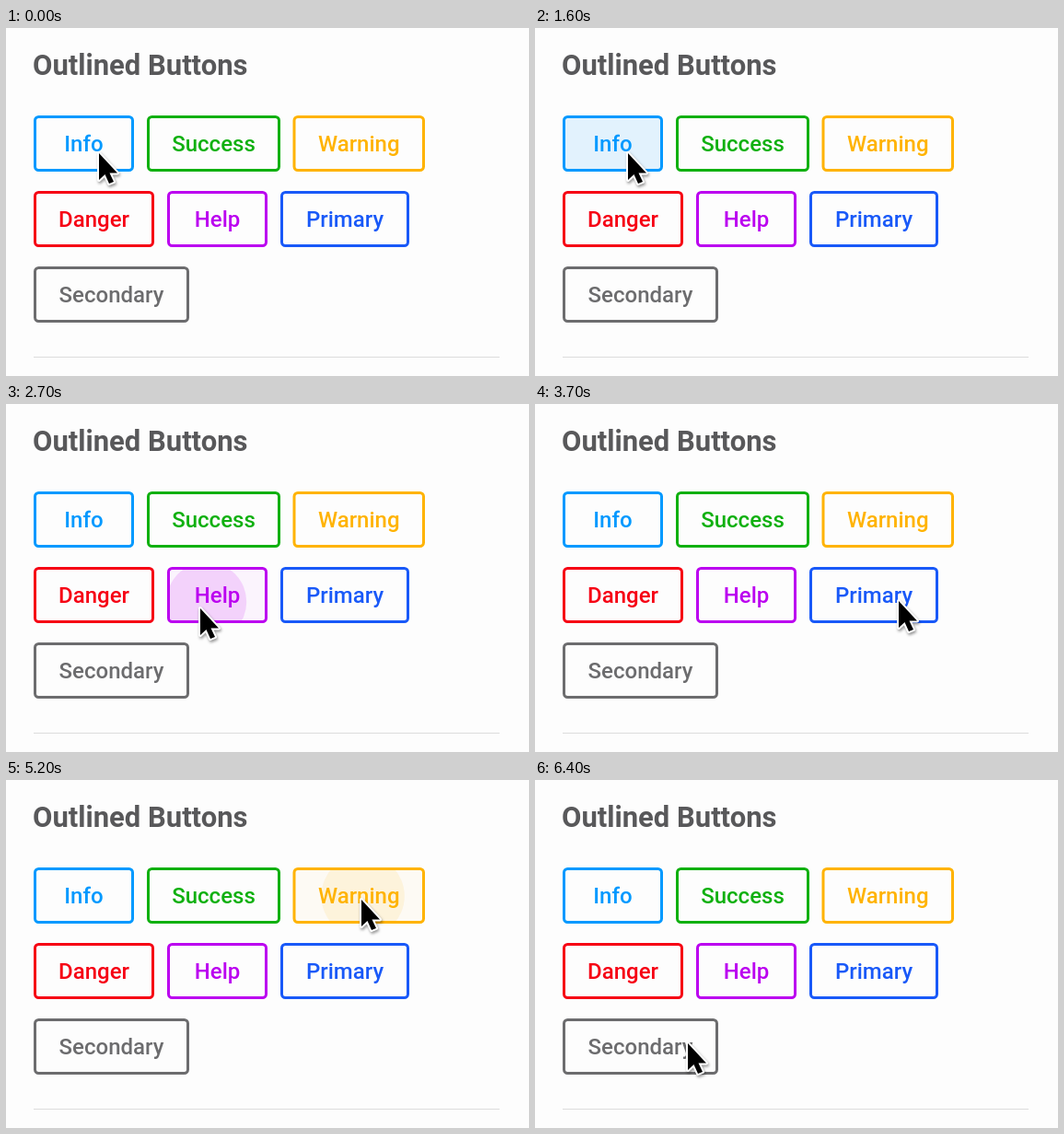
An HTML page for the animation above (6500 ms loop, 568 by 378 pixels).

```html
<!DOCTYPE html>
<html lang="en">
<head>
<meta charset="utf-8">
<title>Outlined Buttons</title>
<style>
  html, body { margin: 0; width: 100%; height: 100%; overflow: hidden; background: #fdfdfd; }
  svg { display: block; width: 568px; height: 378px; font-family: Roboto, sans-serif; }
  .label { font-size: 24px; font-weight: 500; text-anchor: middle; }
  .title { font-size: 31px; font-weight: 700; fill: #58585a; }
</style>
</head>
<body>
<svg id="stage" viewBox="0 0 568 378">
  <text class="title" x="29" y="51">Outlined Buttons</text>
  <g id="buttons"></g>
  <path d="M30 357.5H536" stroke="#dcdcdc"/>
  <g id="cursor">
    <path d="M0 0V29L6.5 23L11 33L16 31L11.5 21.5H20Z" stroke="#fff" stroke-width="4" stroke-linejoin="round"
      style="paint-order: stroke; filter: drop-shadow(1px 2px 1.5px #0006)"/>
  </g>
</svg>
<script>
const LOOP = 6500;
const HOVER = 0.035, FOCUS = 0.07, PRESS = 0.14;

// label, colour, left, top, width, hover start, press time
const BUTTONS = [
  ['Info', '#0099ff', 30, 95, 109, 1000, 1250],
  ['Success', '#10b010', 153, 95, 145],
  ['Warning', '#ffb300', 311.5, 95, 143.5, 5050, 5165],
  ['Danger', '#f60014', 30, 177, 131],
  ['Help', '#bb00f0', 175, 177, 109, 2480, 2640],
  ['Primary', '#1959f8', 298, 177, 140, 3720, 3950],
  ['Secondary', '#6c6c6e', 30, 259, 169]
];
const HEIGHT = 61;

// arrive, leave, x, y
const STOPS = [
  [0, 1950, 101, 136],
  [2500, 3080, 211, 222],
  [3650, 4450, 395, 214],
  [5050, 5650, 386, 130],
  [6300, LOOP, 166, 286]
];

const clamp = v => Math.max(0, Math.min(1, v));
const ramp = (t, from, to) => clamp((t - from) / (to - from));
const mix = (a, b, k) => a + (b - a) * k;
const easeMove = k => k * k * (3 - 2 * k);

// cubic-bezier(.4, 0, .2, 1)
function easeRipple(x) {
  let lo = 0, hi = 1, s = x;
  for (let i = 0; i < 20; i++) {
    s = (lo + hi) / 2;
    const bx = 1.2 * s * (1 - s) ** 2 + 0.6 * s * s * (1 - s) + s ** 3;
    if (bx < x) lo = s; else hi = s;
  }
  return 3 * s * s * (1 - s) + s ** 3;
}

function add(parent, tag, attrs) {
  const node = document.createElementNS('http://www.w3.org/2000/svg', tag);
  for (const key in attrs) node.setAttribute(key, attrs[key]);
  return parent.appendChild(node);
}

function set(node, attrs) {
  for (const key in attrs) node.setAttribute(key, attrs[key]);
}

function cursorAt(t) {
  const next = STOPS.findIndex(([, leave]) => t < leave);
  const [arrive, , x, y] = STOPS[next];
  if (t >= arrive) return [x, y];
  const [, leave, px, py] = STOPS[next - 1];
  const k = easeMove(ramp(t, leave, arrive));
  return [mix(px, x, k), mix(py, y, k)];
}

const layer = document.getElementById('buttons');
const cursor = document.getElementById('cursor');

const active = BUTTONS.map(([text, color, x, y, w, hover, press], i) => {
  const box = { x, y, width: w, height: HEIGHT, rx: 5 };
  const cx = x + w / 2, cy = y + HEIGHT / 2;
  const g = add(layer, 'g', {});
  const clip = add(g, 'clipPath', { id: 'clip' + i });
  add(clip, 'rect', box);
  const fill = add(g, 'rect', { ...box, fill: color, opacity: 0 });
  const inner = add(g, 'g', { 'clip-path': `url(#clip${i})` });
  const ripple = add(inner, 'circle', { fill: color, opacity: 0 });
  add(g, 'rect', {
    x: x + 1.5, y: y + 1.5, width: w - 3, height: HEIGHT - 3, rx: 4,
    fill: 'none', stroke: color, 'stroke-width': 3
  });
  add(g, 'text', { class: 'label', x: cx, y: cy + 8.5, fill: color }).textContent = text;
  return { fill, ripple, cx, cy, w, hover, press };
}).filter(b => b.press);

function drawButton({ fill, ripple, cx, cy, w, hover, press }, t) {
  const age = t - press;
  const tint = HOVER * ramp(t, hover, hover + 100) + FOCUS * ramp(age, 150, 225);
  set(fill, { opacity: tint * (1 - ramp(age, 450, 550)) });

  const k = easeRipple(ramp(age, 0, 225));
  const [x, y] = cursorAt(press);
  set(ripple, {
    cx: mix(x + 2, cx, k),
    cy: mix(y - 4, cy, k),
    r: mix(0.29 * w, Math.hypot(w, HEIGHT) / 2 + 10, k),
    opacity: PRESS * ramp(age, 0, 50) * (1 - ramp(age, 200, 350))
  });
}

function draw(now) {
  const t = now % LOOP;
  active.forEach(b => drawButton(b, t));
  set(cursor, { transform: `translate(${cursorAt(t)})` });
}

const start = performance.now();
function tick() {
  draw(performance.now() - start);
  requestAnimationFrame(tick);
}
tick();
</script>
</body>
</html>
```
